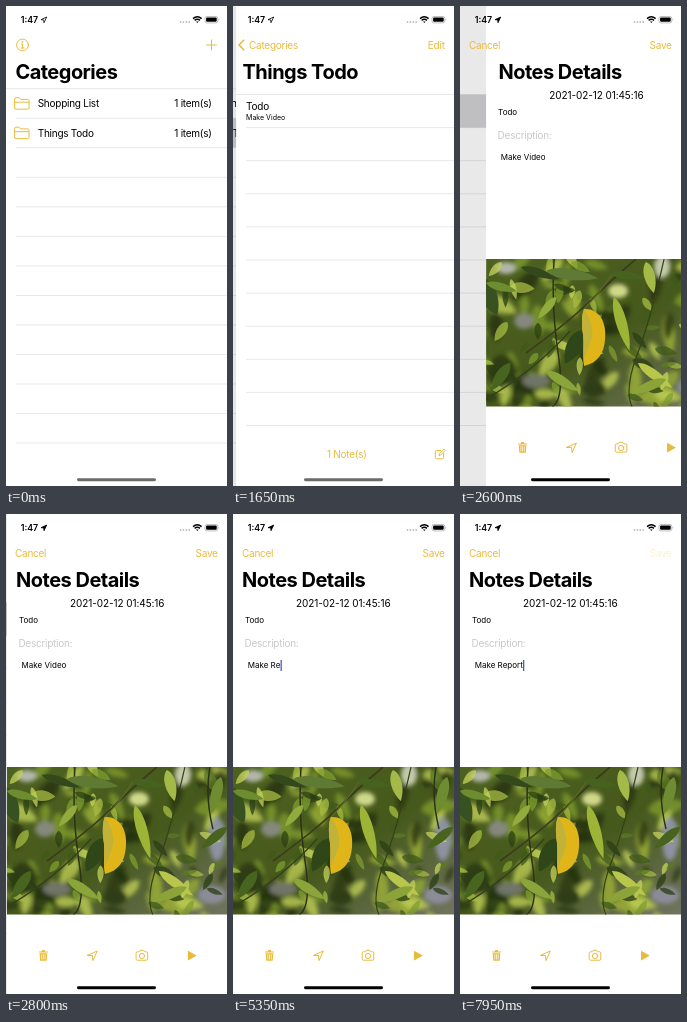
An HTML page that plays this animation: 221x480 px, repeating every 8 s.

```html
<!DOCTYPE html>
<html lang="en">
<head>
<meta charset="utf-8">
<title>Notes app</title>
<style>
  html, body { margin: 0; width: 100%; height: 100%; overflow: hidden; background: #fff; }
  svg.stage { display: block; width: 100vw; height: 100vh; }
  text { font: 10px Inter, "Liberation Sans", sans-serif; letter-spacing: -.025em; white-space: pre; }
  .title { font-size: 20px; font-weight: 700; letter-spacing: -.026em; }
  .clock { font-size: 8.8px; font-weight: 600; letter-spacing: 0; }
  .sub { font-size: 7px; letter-spacing: 0; }
  .field { font-size: 8px; letter-spacing: .002em; }
  .date { letter-spacing: -.008em; }
  .hint { fill: #c9c9cd; }
  .end { text-anchor: end; }
  .mid { text-anchor: middle; }
  .tint { fill: #e9bb3c; }
  .line { fill: none; stroke: #e9bb3c; stroke-width: 1; stroke-linejoin: round; stroke-linecap: round; }
  .rules { stroke: #d9d9dc; stroke-width: .6; }
  .row { fill: #d1d1d4; visibility: hidden; }
  .page { fill: #fff; }
</style>
</head>
<body>
<svg class="stage" viewBox="0 0 221 480">
  <defs>
    <filter id="soft" x="-10%" y="-10%" width="120%" height="120%"><feGaussianBlur stdDeviation="2"/></filter>
    <linearGradient id="shade" x1="0" y1="0" x2="1" y2="1">
      <stop offset="0" stop-color="#4d6120"/>
      <stop offset=".55" stop-color="#46591c"/>
      <stop offset="1" stop-color="#70745f"/>
    </linearGradient>
    <g id="folder" class="line">
      <path d="M.6 11V2Q.6.7 1.9.7H5l1.6 1.7h7Q15 2.4 15 3.7V11Q15 12.2 13.7 12.2H1.9Q.6 12.2.6 11ZM.6 5.2H15"/>
    </g>
  </defs>

  <g class="screen">
    <rect class="page" width="221" height="480"/>
    <rect class="row" y="112" width="221" height="29.5"/>
    <g class="rules" data-first="82.7" data-step="29.53" data-count="13"></g>
    <text class="title" y="73.2">Categories</text>
    <use href="#folder" x="8" y="91"/>
    <text x="31.7" y="101.4">Shopping List</text>
    <text class="end" x="205.7" y="101.4">1 item(s)</text>
    <use href="#folder" x="8" y="120.5"/>
    <text x="31.7" y="130.9">Things Todo</text>
    <text class="end" x="205.7" y="130.9">1 item(s)</text>
    <rect class="dim" width="221" height="480" opacity="0"/>
  </g>

  <g class="screen">
    <rect class="page" width="221" height="480"/>
    <rect class="row" y="88.5" width="221" height="33.2"/>
    <g class="rules" data-first="88.5" data-step="33.1" data-count="11"></g>
    <text class="title" y="73.2">Things Todo</text>
    <text x="10" y="104">Todo</text>
    <text class="sub" x="10" y="114">Make Video</text>
    <text class="tint mid" x="110.7" y="451.7">1 Note(s)</text>
    <path class="line" d="M204.5 444.5h-4q-1.3 0-1.3 1.3v5.7q0 1.3 1.3 1.3h5.7q1.3 0 1.3-1.3v-4M203 449.3l.4-1.7 4.6-4.6 1.3 1.3-4.6 4.6Z"/>
    <rect class="dim" width="221" height="480" opacity="0"/>
  </g>

  <g class="screen">
    <rect class="page" width="221" height="480"/>
    <text class="title" y="73.2">Notes Details</text>
    <text class="date mid" x="110.3" y="92.6">2021-02-12 01:45:16</text>
    <text class="field" x="12" y="109.3">Todo</text>
    <text class="hint" x="11.5" y="133.3">Description:</text>
    <text class="field" id="note" x="14.7" y="154.3">Make Video</text>
    <rect id="caret" y="146" width="1.2" height="11" fill="#3551c4"/>
    <svg id="photo" y="253" width="221" height="147.5" viewBox="0 0 221 147.5"></svg>
    <g transform="translate(36.5 441.5) scale(.9)">
      <path class="tint" d="M-5-4.5h3l.7-1.5h2.6l.7 1.5h3v1.2H-5ZM-4.2-2.6h8.4L3.6 5.7H-3.6Z"/>
      <path d="M-1.9-1.4v5.8M0-1.4v5.8M1.9-1.4v5.8" stroke="#fff" stroke-width=".8"/>
    </g>
    <path class="line" d="M80.7 441.3l9.6-4.3-4.3 9.6-.5-4.8Z"/>
    <g class="line" transform="translate(135 441.5)">
      <path d="M-5.8-2.5q0-1.2 1.2-1.2h1.7l1.1-1.5h3.6l1.1 1.5h1.7q1.2 0 1.2 1.2v6q0 1.2-1.2 1.2h-9.2q-1.2 0-1.2-1.2Z"/>
      <circle cy=".5" r="2.6"/>
    </g>
    <path class="tint" d="M181 437.2v8.8q0 .6.6.3l7.6-4.3q.5-.4 0-.8l-7.6-4.3q-.6-.3-.6.3Z"/>
  </g>

  <g class="nav">
    <circle class="line" cx="16.5" cy="39" r="5.9"/>
    <path class="line" d="M15.3 38h1.3v4M15.1 42h3"/>
    <circle class="tint" cx="16.4" cy="35.9" r=".9"/>
    <path class="line" d="M200.5 39h10M205.5 34v10"/>
  </g>
  <g class="nav">
    <path class="line" style="stroke-width:1.6" d="M10.7 34.2L6 39l4.7 4.8"/>
    <text class="tint" x="16" y="42.7">Categories</text>
    <text class="tint end" x="211.7" y="42.7">Edit</text>
  </g>
  <g class="nav">
    <text class="tint" x="9" y="42.7">Cancel</text>
    <text class="tint end" id="save" x="211.7" y="42.7">Save</text>
  </g>

  <text class="clock" x="14.7" y="16.9">1:47</text>
  <path id="locator" d="M35 13.7l5.7-2.7-2.7 5.7-.3-2.8Z" stroke="#000" stroke-width=".8" stroke-linejoin="round"/>
  <g fill="#bdbdbd">
    <circle cx="174.5" cy="16" r=".9"/><circle cx="177.4" cy="16" r=".9"/>
    <circle cx="180.3" cy="16" r=".9"/><circle cx="183.2" cy="16" r=".9"/>
  </g>
  <g fill="none" stroke="#000" stroke-width="1.4">
    <path d="M187 12.6q4.3-3.6 8.6 0M188.6 14.4q2.7-2.2 5.4 0"/>
    <path d="M190 15.4h2.6l-1.3 1.5Z" fill="#000" stroke="none"/>
  </g>
  <rect x="199" y="10.5" width="12.8" height="6.4" rx="1.9" fill="none" stroke="#a5a5a5" stroke-width=".7"/>
  <rect x="200.1" y="11.6" width="10.6" height="4.2" rx="1"/>
  <path d="M212.7 12.6q1.3 1.1 0 2.2Z" fill="#a5a5a5"/>
  <rect id="home" x="71" y="472.3" width="79" height="2.9" rx="1.45"/>
</svg>

<script>
const LOOP = 8000, STEP = 50, WIDTH = 221;
const $ = id => document.getElementById(id);
const all = css => [...document.querySelectorAll(css)];
const clamp = v => Math.min(1, Math.max(0, v));
const ramp = (t, from, to) => clamp((t - from) / (to - from));

const screens = all('.screen'), titles = all('.title'), navs = all('.nav'), rows = all('.row'), dims = all('.dim');
const note = $('note'), caret = $('caret');

// Separators: the first runs edge to edge, the rest are inset
for (const g of all('.rules')) {
  const { first, step, count } = g.dataset;
  let d = '';
  for (let i = 0; i < count; i++) d += `M${i ? 10 : 0} ${+first + i * step}H${WIDTH}`;
  g.innerHTML = `<path d="${d}"/>`;
}

function paintPhoto() {
  let seed = 11;
  const rnd = () => (seed = seed * 16807 % 2147483647) / 2147483647;
  const pick = list => list[Math.floor(rnd() * list.length)];
  const leaf = (x, y, len, wide, turn, fill, alpha = 1) =>
    `<path transform="translate(${x} ${y}) rotate(${turn})" fill="${fill}" opacity="${alpha}"
      d="M0 0C${len * .2} ${-wide} ${len * .7} ${-wide * .8} ${len} 0C${len * .7} ${wide * .8} ${len * .2} ${wide} 0 0"/>`;
  const scatter = (n, min, max, colours, alpha) => {
    let s = '';
    for (let i = 0; i < n; i++) {
      const len = min + rnd() * (max - min);
      s += leaf(rnd() * 250 - 20, rnd() * 165 - 15, len, len * (.2 + rnd() * .14), rnd() * 150 - 10, pick(colours), alpha);
    }
    return s;
  };
  const glow = (x, y, rx, ry, fill) => `<ellipse cx="${x}" cy="${y}" rx="${rx}" ry="${ry}" fill="${fill}"/>`;
  const stem = (d, w, c) => `<path d="${d}" fill="none" stroke="${c}" stroke-width="${w}"/>`;

  const far = scatter(80, 16, 40, ['#9fb235', '#bfce55', '#2b3a14', '#7d9a2b', '#24310f', '#93aa38'], .8)
    + glow(20, 9, 10, 6, '#b3b7aa') + glow(176, 8, 8, 11, '#c3c9ab') + glow(38, 62, 10, 8, '#85887c')
    + glow(210, 72, 8, 22, '#8d91a0') + glow(205, 128, 14, 9, '#8b8c98') + glow(50, 122, 14, 7, '#6f7468')
    + glow(132, 32, 10, 7, '#d0d98a') + glow(16, 112, 14, 16, '#2f3d17') + glow(108, 130, 12, 8, '#2d3c14');
  const mid = scatter(60, 10, 26, ['#7f9e2f', '#3f5a1a', '#a7bd42', '#2a3e13', '#c5d35c', '#5b7a24'], .75);
  const stems = stem('M68 0Q65 48 72 94T66 148', 1.5, '#2c3316')
    + stem('M40 94Q84 62 104 42T150 0', 1.7, '#3a3b1c') + stem('M98 50Q112 36 126 15', 1.2, '#5f6a25')
    + stem('M178 0Q164 62 151 96T146 148', 1.2, '#354018') + stem('M203 0Q198 30 206 62', 1.5, '#2b3318')
    + stem('M0 140Q48 112 84 72', 1.2, '#333f1a');
  const near = [
    [-6, 18, 42, 13, 66, '#385120'], [0, 24, 32, 6, 15, '#6d8d30'],
    [35, 8, 40, 6, 18, '#33491c'], [60, 12, 52, 8, 8, '#5f7a34'],
    [70, 38, 28, 6, 130, '#91ac3c'], [128, 38, 56, 8, 74, '#9db537'],
    [124, 14, 34, 6, 8, '#45631f'], [160, 3, 32, 8, 76, '#a4ba48'],
    [214, 10, 38, 8, 105, '#6f8c33'], [220, 60, 34, 7, 140, '#47631f'],
    [60, 112, 38, 7, 32, '#8aa63a'], [24, 104, 34, 8, 125, '#48651f'],
    [152, 104, 42, 7, 36, '#b8c64b'], [180, 120, 38, 7, 157, '#8ca33a'],
    [97, 71, 38, 12, 118, '#2f4718']
  ].map(a => leaf(...a)).join('');

  $('photo').innerHTML = `<rect width="221" height="148" fill="url(#shade)"/>
    <g filter="url(#soft)">${far}</g>${mid}${stems}${near}
    <path fill="#dfb51a" d="M98 50C112 49 121 62 119 80C118 95 111 104 98 107C96 97 98 88 97 76C95 63 96 54 98 50"/>
    <path fill="#c2b338" d="M98 50C106 62 108 74 105 82L98 100C97 90 98 84 97 76C95 63 96 54 98 50"/>`;
}

// Critically damped slide, 0 to 1
function slide(t, start, rate, shown) {
  if (t < shown) return 0;
  const u = (t - start) * rate;
  return u > 11 ? 1 : 1 - (1 + u) * Math.exp(-u);
}

const deletes = [3600, 3800, 3950, 4100, 4600];
const types = [4900, 5350, 5550, 5750, 5950, 6450];
const past = (times, t) => times.filter(x => t >= x).length;

function noteAt(t) {
  const old = 'Make Video';
  return old.slice(0, old.length - past(deletes, t)) + 'Report'.slice(0, past(types, t));
}

function caretAt(t) {
  if (t < 3200) return 0;
  return t < 7300 ? 1 - ramp(t, 6750, 6950) : ramp(t, 7300, 7600);
}

function draw(t) {
  const p = [1, slide(t, 1390, .024, 1400), slide(t, 2416, .02, 2550), 0];
  screens.forEach((s, i) => {
    const x = WIDTH * (1 - p[i]) - 66 * p[i + 1];
    const leaving = clamp(1 - 2 * p[i + 1]);
    s.setAttribute('transform', `translate(${x.toFixed(2)} 0)`);
    navs[i].style.opacity = Math.min(clamp(p[i] * 1.4 - .2), leaving);
    titles[i].style.opacity = leaving;
    if (dims[i]) dims[i].setAttribute('opacity', .1 * p[i + 1]);
  });
  // The second title settles ahead of its page, the third trails it
  titles[0].setAttribute('x', 9.4);
  titles[1].setAttribute('x', 9.4 - Math.min(3, WIDTH * (1 - p[1])));
  titles[2].setAttribute('x', 9.1 + 28 * (1 - p[2]));
  rows[0].style.visibility = t >= 1400 ? 'visible' : 'hidden';
  rows[1].style.visibility = t >= 2050 ? 'visible' : 'hidden';

  const text = noteAt(t);
  if (note.textContent !== text) note.textContent = text;
  caret.setAttribute('x', 14.9 + note.getComputedTextLength());
  caret.setAttribute('opacity', caretAt(t));

  $('save').style.opacity = 1 - .8 * ramp(t, 7750, 7950);
  $('locator').setAttribute('fill', t >= 2400 ? '#000' : 'none');
  const grey = Math.round(107 * (1 - ramp(t, 2000, 2400)));
  $('home').setAttribute('fill', `rgb(${grey},${grey},${grey})`);
}

const begin = performance.now();
function tick() {
  const t = (performance.now() - begin) % LOOP;
  draw(Math.floor(t / STEP) * STEP);
  requestAnimationFrame(tick);
}
paintPhoto();
tick();
</script>
</body>
</html>
```
